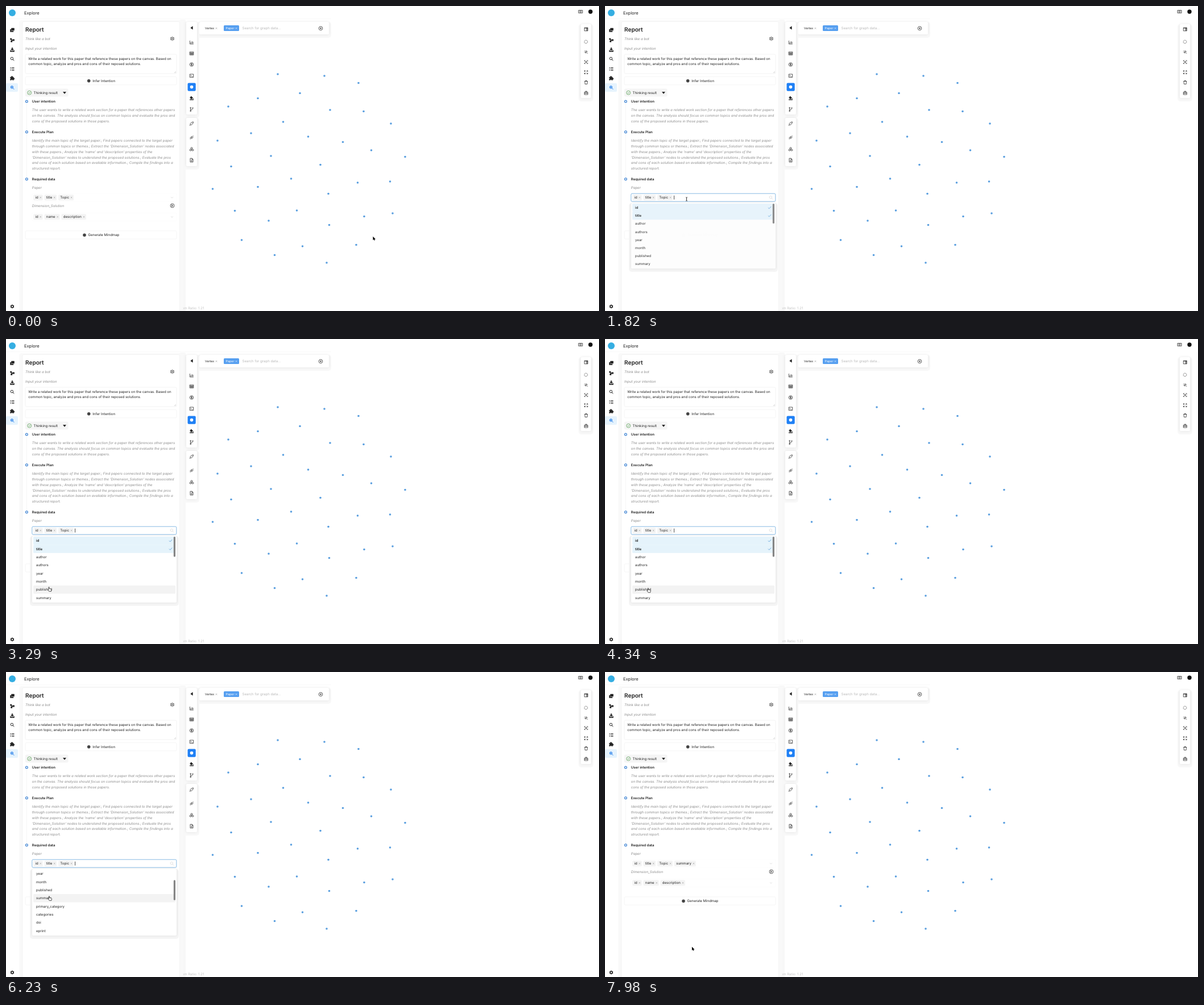
These frames come from a looping animation (1043 px wide and 537 px high, 8 s). An HTML page with a canvas:

```html
<!DOCTYPE html>
<html lang="en">
<head>
<meta charset="utf-8">
<title>Explore</title>
<style>
html, body { margin: 0; width: 100%; height: 100%; overflow: hidden; background: #fff; }
canvas { display: block; }
</style>
</head>
<body>
<canvas id="stage" width="1043" height="537"></canvas>
<script>
const ctx = document.getElementById('stage').getContext('2d');
const LOOP = 8000, OPEN = 1740, PICK = 6500, CLOSE = 7650, FADE = 200, HOVER_LAG = 200;
const ROW = 14.35, MENU_TOP = 347, MENU_BOTTOM = 464;
const BLUE = '#1f7bea', INK = '#222', GREY = '#8c8c8c';

// [time, x, y] of the pointer's hot spot
const pointerKeys = [
  [0, 645.5, 406], [560, 645.5, 406], [1330, 143.5, 340], [2660, 143.5, 340],
  [3080, 75.5, 436.5], [4300, 75.5, 436.5], [4480, 78, 451], [4700, 78, 451],
  [4830, 79, 436.5], [5110, 77, 412], [5500, 76, 394.5], [6860, 76, 394.5],
  [7140, 160, 419.5], [7560, 153, 484], [LOOP, 153, 484]
];
const fields = ['id', 'title', 'author', 'authors', 'year', 'month', 'published', 'summary',
  'primary_category', 'categories', 'doi', 'eprint'];
const nodes = [478,120, 560,123, 620,135.5, 517,153.5, 443,162.5, 391,177, 570,183, 629,185.5,
  677,207, 487.5,204, 431,224, 531.5,230, 592.5,239.5, 372,237, 642.5,254, 702,265.5, 466,264,
  553,279.5, 396,282.5, 501.5,304, 618.5,311, 675.5,309, 363.5,322, 443,318.5, 567,330.5,
  402.5,360.5, 511.5,360, 680,365, 630,370.5, 462,378, 568.5,385.5, 414.5,412, 616,420.5,
  521.5,423, 472.5,438.5, 564,452];

// Icon outlines around (0,0)
const shapes = {
  stack: 'M-1.5-3H3.5V1H-1.5ZM-3.5-1H-2V2H2V3.5H-3.5Z',
  graph: 'M-3.5-3H-1V-.8H-3.5ZM1-1.2H3.7V1.2H1ZM-2.5 1H0V3.4H-2.5ZM-2-1.5 1.5 0-1 2',
  load: 'M-.8-3.5H.8V-1H2.5L0 1.5-2.5-1H-.8ZM-3.5 1H-2.3V2.3H2.3V1H3.5V3.5H-3.5Z',
  search: 'M1.6-.6A2.2 2.2 0 1 1-2.8-.6 2.2 2.2 0 1 1 1.6-.6M1 1 3.3 3.3',
  list: 'M-.8-2.5H3.5M-.8 0H3.5M-.8 2.5H3.5M-3.5-2.5-2.8-1.9-1.8-3.1M-3.5 0-2.8.6-1.8-.6M-3.3 2.5H-2',
  puzzle: 'M-3.5-1.8H-1.6A1.2 1.2 0 1 1 .6-1.8H2.3V0A1.1 1.1 0 1 1 2.3 2V3.5H.6A1.1 1.1 0 0 0-1.6 3.5H-3.5V1.8A1.1 1.1 0 0 0-3.5-.3Z',
  zoom: 'M1.6-.6A2.2 2.2 0 1 1-2.8-.6 2.2 2.2 0 1 1 1.6-.6M1 1 3.3 3.3M-1.7-.6H.5M-.6-1.7V.5',
  gear: 'M0-3.3 1.2-2.2 2.9-1.7 2.5 0 2.9 1.7 1.2 2.2 0 3.3-1.2 2.2-2.9 1.7-2.5 0-2.9-1.7-1.2-2.2ZM1.2 0A1.2 1.2 0 1 1-1.2 0 1.2 1.2 0 1 1 1.2 0',
  back: 'M1.7-2.6V2.6L-1.7 0Z',
  chart: 'M-3-3V3H3.3M-1.3 2V0M.6 2V-2M2.4 2V-1',
  table: 'M-3.3-2.7H3.3V2.7H-3.3ZM-3.3-1H3.3M-3.3.8H3.3M-1-1V2.7M1.2-1V2.7',
  coin: 'M3.2 0A3.2 3.2 0 1 1-3.2 0 3.2 3.2 0 1 1 3.2 0M1.2-1.2C-1.8-2.2-1.8 0 0 0S1.6 2.2-1.2 1.2M0-2.2V2.2',
  terminal: 'M-3.2-2.8H3.2V2.8H-3.2ZM-1.8-1.2-.6 0-1.8 1.2M.3 1.3H1.8',
  bucket: 'M-.8-3.2 2.3-.2-.6 2-3-.5ZM2.8.4 3.3 1.6H2.3ZM-3.2 2.5H3.2V3.5H-3.2Z',
  branch: 'M-1.8-1.6V2M2-1.6C2 .6-1.5 0-1.8 2M-1.2-2.6A.7.7 0 1 1-2.5-2.6.7.7 0 1 1-1.2-2.6M2.7-2.4A.7.7 0 1 1 1.3-2.4.7.7 0 1 1 2.7-2.4M-1.2 2.8A.7.7 0 1 1-2.5 2.8.7.7 0 1 1-1.2 2.8',
  rocket: 'M3-3C0-3-1-1.2-2.6.4L-.4 2.6C1.2 1 3 0 3-3ZM-2.4 1.6-3.2 3.2-1.6 2.4M1.4-.9H.7',
  link: 'M-3 1.5-.5-1.5H1L3-3M3-1 .8 1.6H-.8L-2.8 3M-1 .5 1-.5',
  cubes: 'M0-3.2 1.4-2.4V-.9L0-.2-1.4-.9V-2.4ZM-1.9.1-.5.8V2.4L-1.9 3.1-3.3 2.4V.8ZM1.9.1 3.3.8V2.4L1.9 3.1.5 2.4V.8Z',
  file: 'M-2.5-3.3H.8L2.5-1.5V3.3H-2.5ZM.6-3.2V-1.3H2.4M-1.2.2H1.2M-1.2 1.8H1.2',
  book: 'M-3.5-2.5H3.5V2.3H-3.5ZM0-2.5V2.3M-2.3-1H-1.2M-2.3.6H-1.2M1.2-1H2.3M1.2.6H2.3',
  layout: 'M-3-2.8H3V2.8H-3ZM.8-2.8V2.8M1.9-2.8V2.8M-3-2H3',
  bolt: 'M-2.5-2.5 2.8 2.8M-.5-2.8 2.4-.3M-2.8-.4-.2 2.4M-1.5 1.5 1.5-1.5',
  focus: 'M-2.8-1.2V-2.8H-1.2M1.2-2.8H2.8V-1.2M2.8 1.2V2.8H1.2M-1.2 2.8H-2.8V1.2M-1-1H1V1H-1Z',
  expand: 'M-2.8-1V-2.8H-1M1-2.8H2.8V-1M2.8 1V2.8H1M-1 2.8H-2.8V1M-2.7-2.7-1-1M2.7-2.7 1-1M2.7 2.7 1 1M-2.7 2.7-1 1',
  trash: 'M-3-2H3M-1-2V-3H1V-2M-2.2-2-1.9 3H1.9L2.2-2',
  robot: 'M-3-1.3H3V3H-3ZM-1.2-1.3V-3H1.2V-1.3M-3 .6H3M-1 .2V1.2M1 .2V1.2',
  plus: 'M3.3 0A3.3 3.3 0 1 1-3.3 0 3.3 3.3 0 1 1 3.3 0M-1.6 0H1.6M0-1.6V1.6',
  play: 'M3.4 0A3.4 3.4 0 1 1-3.4 0 3.4 3.4 0 1 1 3.4 0M-.8-1.6 1.4 0-.8 1.6Z',
  done: 'M3.4 0A3.4 3.4 0 1 1-3.4 0 3.4 3.4 0 1 1 3.4 0M-1.5 0-.4 1.2 1.6-1.2',
  down: 'M-2.7-1.5H2.7L0 1.8Z',
  chevron: 'M-1.8-1 0 1 1.8-1',
  cross: 'M-1.4-1.4 1.4 1.4M1.4-1.4-1.4 1.4',
  check: 'M-2.6 0-.8 1.8 2.6-2',
  arrow: 'M0 0V6L1.4 4.8 2.3 6.8 3.4 6.3 2.5 4.4H4.3Z',
  beam: 'M-1.4-3.2Q0-3.2 0-2.4 0-3.2 1.4-3.2M0-2.4V2.4M-1.4 3.2Q0 3.2 0 2.4 0 3.2 1.4 3.2',
  hand: 'M-.7 4.8V.6Q0-.6.7.6V3L3.8 3.7Q4.6 4 4.4 5L3.9 7.8H.2L-1.9 5.2Q-1.6 4.1-.7 4.8Z'
};
for (const name in shapes) shapes[name] = new Path2D(shapes[name]);

const clamp = v => Math.max(0, Math.min(1, v));
const smooth = (t, a, b) => { const p = clamp((t - a) / (b - a)); return p * p * (3 - 2 * p); };
const easeOut = p => 1 - (1 - clamp(p)) ** 5;

function icon(name, x, y, { color = INK, fill, width = .75 } = {}) {
  ctx.save();
  ctx.translate(x, y);
  ctx.strokeStyle = color;
  ctx.lineWidth = width;
  if (fill) { ctx.fillStyle = fill; ctx.fill(shapes[name]); }
  ctx.stroke(shapes[name]);
  ctx.restore();
}

function text(str, x, y, { size = 6.08, weight = 400, color = INK, italic = false, align = 'left' } = {}) {
  ctx.font = `${italic ? 'italic ' : ''}${weight} ${size}px Inter, sans-serif`;
  ctx.fillStyle = color;
  ctx.textAlign = align;
  ctx.fillText(str, x, y + size * .36);
}

function box(x, y, right, bottom, { fill, stroke, radius = 2 } = {}) {
  ctx.beginPath();
  ctx.roundRect(x, y, right - x, bottom - y, radius);
  if (fill) { ctx.fillStyle = fill; ctx.fill(); }
  if (stroke) { ctx.strokeStyle = stroke; ctx.lineWidth = .8; ctx.stroke(); }
}

// White card on a flat, slightly blurred halo
function card(x, y, right, bottom, halo = '#f8f8f8') {
  box(x - 4, y, right + 4, bottom + 6, { fill: halo, radius: 5 });
  ctx.save();
  ctx.shadowColor = 'rgba(0,0,0,.09)';
  ctx.shadowBlur = 5;
  box(x, y, right, bottom, { fill: '#fff' });
  ctx.restore();
}

function disc(x, y, r, color) {
  ctx.beginPath();
  ctx.arc(x, y, r, 0, 7);
  ctx.fillStyle = color;
  ctx.fill();
}

function column(x, items, style) {
  for (const [name, y] of items) icon(name, x, y, style);
}

function pointerAt(t) {
  const i = Math.max(1, pointerKeys.findIndex(k => k[0] >= t));
  const [t0, x0, y0] = pointerKeys[i - 1], [t1, x1, y1] = pointerKeys[i];
  const p = smooth(t, t0, t1);
  return [x0 + (x1 - x0) * p, y0 + (y1 - y0) * p];
}

function drawChrome() {
  box(0, 22, 572, 22.8, { fill: '#f7f7f7', radius: 0 });
  disc(11, 12, 6, '#35aee2');
  text('Explore', 32, 12, { size: 7.5 });
  icon('book', 1010.5, 10);
  disc(1028, 10, 3.7, '#111');

  box(0, 136, 21, 151, { fill: '#e6f3fd' });
  column(11, [['stack', 42], ['graph', 60], ['load', 77], ['puzzle', 127], ['gear', 529]], { fill: INK, width: .5 });
  disc(11, 529, 1.2, '#fff');
  column(11, [['search', 93], ['list', 111]], { width: 1 });
  icon('zoom', 11, 143.5, { color: BLUE, width: 1 });

  box(305, 24, 316, 545, { fill: '#f8f8f8' });
  for (let i = 0; i < nodes.length; i += 2) disc(nodes[i], nodes[i + 1], 1.8, '#5a9fdf');
  text('Zoom Ratio: 1.21', 348.5, 531.5, { color: '#c4c4c4', align: 'right' });

  card(340, 28, 568, 50);
  text('Vertex', 350, 39, { size: 5.3 });
  icon('cross', 370, 39.3, { color: GREY, width: .5 });
  box(383, 34, 410, 44, { fill: '#569ff0', radius: 1.5 });
  text('Paper', 386.5, 39, { size: 5.4, color: '#fff' });
  icon('cross', 405, 39.3, { color: '#fff', width: .5 });
  text('Search for graph data...', 415.5, 39, { color: '#b8b8b8' });
  icon('plus', 553.5, 39.3);

  card(317, 28, 336, 191);
  card(317, 197, 336, 282);
  box(319.5, 135.5, 333.7, 149.7, { fill: '#1f80f5' });
  disc(326.5, 142.6, 2.8, '#fff');
  icon('back', 326.5, 38.5, { fill: INK });
  icon('bucket', 326.5, 162, { fill: INK, width: .4 });
  column(326.5, [['chart', 64], ['table', 83.5], ['coin', 103], ['terminal', 122.8], ['branch', 182],
    ['rocket', 207], ['link', 231.5], ['cubes', 252], ['file', 271.5]]);

  card(1011, 32, 1029, 162);
  ctx.setLineDash([1.4, 1]);
  ctx.strokeStyle = INK;
  ctx.lineWidth = .8;
  ctx.beginPath();
  ctx.arc(1020, 63, 2.8, 0, 7);
  ctx.stroke();
  ctx.setLineDash([]);
  column(1020.3, [['layout', 41], ['bolt', 81], ['focus', 98.7], ['expand', 116.7], ['trash', 134.5], ['robot', 153]]);
  box(1040, 23, 1041, 537, { fill: '#fafafa', radius: 0 });
}

function paragraph(lines, y) {
  lines.forEach((line, i) => text(line, 45.8, y + i * 9.8, { italic: true, color: GREY }));
}

function button(label, y, x) {
  box(34, y - 7.3, 300, y + 7, { fill: '#fff', stroke: '#f3f3f3' });
  disc(x - 6.5, y, 2.8, '#444');
  text(label, x, y);
}

// Draws a tag select and returns the x of its input caret
function tagSelect(tags, y, focused) {
  box(45.8, y - 7, 299.8, y + 7, { fill: '#fff', stroke: focused ? '#69a9de' : '#fcfcfc' });
  let x = 51.5;
  for (const tag of tags) {
    ctx.font = '400 6.08px Inter, sans-serif';
    const close = x + ctx.measureText(tag).width + 4;
    box(x - 3.3, y - 5, close + 4, y + 5, { fill: '#f4f4f4', radius: 1.5 });
    text(tag, x, y);
    icon('cross', close, y, { color: GREY, width: .5 });
    x = close + 10.1;
  }
  icon(focused ? 'search' : 'chevron', 292, y, { color: '#cfcfcf', width: .6 });
  return x - 4;
}

function drawPanel(t) {
  box(23.5, 25, 311.5, 545, { fill: '#f9f9f9', radius: 4 });
  box(29, 27.5, 305.5, 545, { fill: '#fff', stroke: '#f1f1f1' });
  text('Report', 34, 41, { size: 10.1, weight: 600 });
  text('Think like a bot', 34, 57.5, { italic: true, color: GREY });
  icon('gear', 292.5, 57.5);
  text('Input your intention', 34, 75, { italic: true, color: GREY });
  box(34, 85, 300, 119, { fill: '#fff', stroke: '#f0f0f0' });
  text('Write a related work for this paper that reference these papers on the canvas. Based on', 39.2, 92.5);
  text('common topic, analyze and pros and cons of their reposed solutions.', 39.2, 102);
  ctx.strokeStyle = '#aaa';
  ctx.lineWidth = .5;
  ctx.beginPath();
  ctx.moveTo(296, 118); ctx.lineTo(299, 115);
  ctx.moveTo(298, 118); ctx.lineTo(299, 117);
  ctx.stroke();
  button('Infer Intention', 131.8, 152.2);

  box(34, 145.5, 109.5, 159.5, { fill: '#f5f5f5' });
  icon('done', 41.2, 152.7, { color: '#4d9a4a' });
  text('Thinking result', 48.5, 152.7);
  icon('down', 103, 152.8, { fill: '#111', width: .3 });

  box(36, 172, 36.9, 302, { fill: '#f5f5f5', radius: 0 });
  for (const [title, y] of [['User intention', 167.8], ['Execute Plan', 221.6], ['Required data', 304.6]]) {
    disc(36.4, y + .2, 2.5, '#3a80d2');
    disc(36.4, y + .2, 1.3, '#fff');
    text(title, 45.8, y, { weight: 600 });
  }
  paragraph(['The user wants to write a related work section for a paper that references other papers',
    'on the canvas. The analysis should focus on common topics and evaluate the pros and',
    'cons of the proposed solutions in those papers.'], 183);
  paragraph(['Identify the main topic of the target paper.; Find papers connected to the target paper',
    "through common topics or themes.; Extract the 'Dimension_Solution' nodes associated",
    "with these papers.; Analyze the 'name' and 'description' properties of the",
    "'Dimension_Solution' nodes to understand the proposed solutions.; Evaluate the pros",
    'and cons of each solution based on available information.; Compile the findings into a',
    'structured report.'], 237);

  paragraph(['Paper'], 320.2);
  paragraph(['Dimension_Solution'], 351.6);
  icon('play', 292.5, 351.5);
  tagSelect(['id', 'name', 'description'], 371.3, false);
  button('Generate Mindmap', 403.2, 144.5);

  const focused = t >= OPEN && t < CLOSE;
  const tags = ['id', 'title', 'Topic'].concat(t >= PICK ? 'summary' : []);
  const caretX = tagSelect(tags, 337.2, focused);
  const caretOn = t < 2200 || (t - 200) % 1000 < 500;
  if (focused && caretOn) {
    ctx.fillStyle = INK;
    ctx.fillRect(caretX, 333.7, .8, 7);
  }
}

function drawMenu(t) {
  const shown = t < CLOSE ? easeOut((t - OPEN) / FADE) : 1 - easeOut((t - CLOSE) / FADE);
  if (t < OPEN || shown <= 0) return;
  const scroll = 4 * ROW * smooth(t, 4400, 4700);
  const [hx, hy] = pointerAt(Math.max(0, t - HOVER_LAG));
  const inside = hx > 46 && hx < 300 && hy > MENU_TOP + 1 && hy < MENU_BOTTOM;
  const hovered = inside ? Math.floor((hy + scroll - MENU_TOP - 1) / ROW) : -1;

  ctx.save();
  ctx.globalAlpha = shown;
  ctx.translate(0, MENU_TOP);
  ctx.scale(1, .8 + .2 * shown);
  ctx.translate(0, -MENU_TOP);
  card(46, MENU_TOP, 300, MENU_BOTTOM, '#f5f5f5');
  ctx.beginPath();
  ctx.rect(46, MENU_TOP + .8, 254, MENU_BOTTOM - MENU_TOP - 1.2);
  ctx.clip();
  fields.forEach((field, i) => {
    const y = MENU_TOP + 1 + (i + .5) * ROW - scroll;
    const selected = i < 2 || field === 'summary' && t >= PICK;
    if (selected || i === hovered)
      box(48, y - ROW / 2, 298, y + ROW / 2, { fill: selected ? '#e5f3fb' : '#f3f3f3', radius: 1.5 });
    text(field, 53, y, { weight: selected ? 600 : 400 });
    if (selected) icon('check', 289.5, y, { color: '#4b95d6' });
  });
  const thumb = MENU_TOP + 1 + scroll * .32;
  box(294.8, thumb, 298, thumb + 35.5, { fill: '#858585', radius: 1.6 });
  ctx.restore();
}

function drawPointer(t) {
  const [x, y] = pointerAt(t);
  const inPanel = x > 46 && x < 300;
  const menuOpen = t >= OPEN && t < CLOSE;
  if (inPanel && y > 330 && y < 344.5) icon('beam', x, y, { width: .9 });
  else if (inPanel && menuOpen && y > MENU_TOP && y < MENU_BOTTOM) icon('hand', x, y, { fill: '#fff', width: .8 });
  else {
    icon('arrow', x, y, { color: '#fff', width: 1.4 });
    icon('arrow', x, y, { color: '#000', fill: '#000', width: .2 });
  }
}

function draw(now) {
  const t = now % LOOP;
  ctx.textRendering = 'geometricPrecision';
  ctx.fillStyle = '#fff';
  ctx.fillRect(0, 0, 1043, 537);
  drawChrome();
  drawPanel(t);
  drawMenu(t);
  drawPointer(t);
  requestAnimationFrame(draw);
}
requestAnimationFrame(draw);
</script>
</body>
</html>
```
